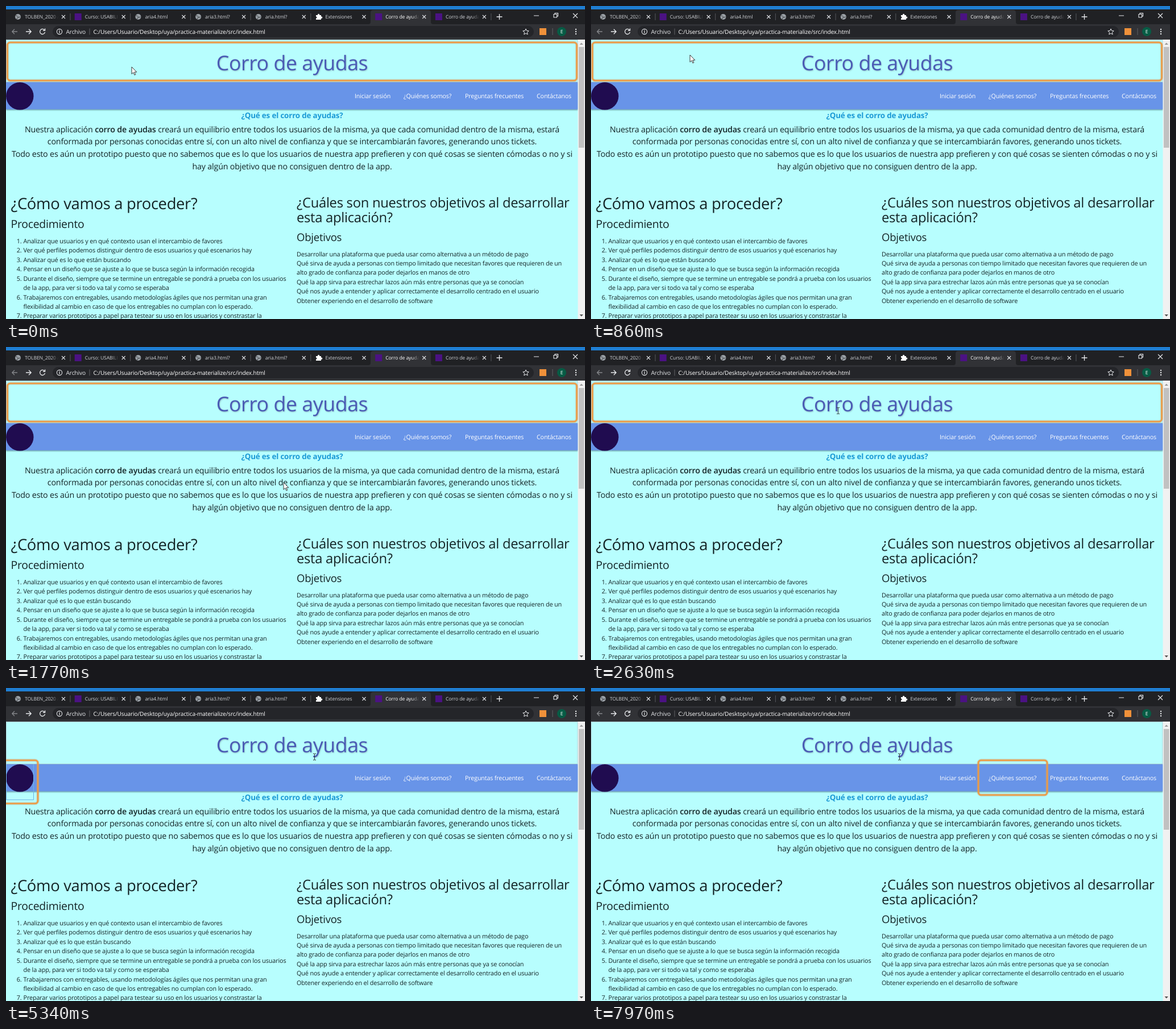
These frames come from a looping animation (1018x550 px, 8 s). An HTML page:

```html
<!DOCTYPE html>
<html lang="es">
<head>
<meta charset="utf-8">
<title>Corro de ayudas</title>
<style>
html, body { margin: 0; width: 100%; height: 100%; overflow: hidden; background: #b7fefe; }
svg { display: block; width: 1018px; height: 550px; }
text { font-family: "Open Sans", "Noto Sans", sans-serif; letter-spacing: -.0124em; text-rendering: geometricPrecision; white-space: pre; }
#intro { font-size: 14.27px; text-anchor: middle; }
#intro tspan { font-weight: 600; }
#lists { font-size: 10.83px; }
#nav { font-size: 10.7px; font-weight: 500; fill: #fff; }
#tabs text { font-size: 8.6px; }
.icon { fill: none; stroke: #e8eaed; stroke-width: 1.3; }
</style>
</head>
<body>
<svg viewBox="0 0 1018 550" fill="#142426">
  <defs>
    <filter id="soft" x="-10%" y="-30%" width="120%" height="170%"><feGaussianBlur stdDeviation="1"/></filter>
  </defs>
  <rect width="1018" height="550" fill="#b7fefe"/>

  <!-- page header -->
  <rect x=".5" y="59.5" width="1004.5" height="74" fill="none" stroke="#a0aeb6" opacity=".6"/>
  <g font-size="35.7" text-anchor="middle">
    <text x="503.7" y="114" fill="#334" opacity=".3" filter="url(#soft)">Corro de ayudas</text>
    <text x="503" y="112.5" fill="#4a5bb5">Corro de ayudas</text>
  </g>
  <rect y="135" width="1005.5" height="48" fill="#245" opacity=".5" filter="url(#soft)"/>
  <rect y="134" width="1005.5" height="47.5" fill="#6894e8"/>
  <circle cx="24.3" cy="158.3" r="24.2" fill="#200c50"/>
  <g id="nav"></g>

  <!-- page body -->
  <text x="503" y="196.5" font-size="13.4" font-weight="700" fill="#1c9ad6" text-anchor="middle">¿Qué es el corro de ayudas?</text>
  <g id="intro"></g>
  <text x="8.5" y="356.5" font-size="27.4">¿Cómo vamos a proceder?</text>
  <text x="8.5" y="390" font-size="19.4">Procedimiento</text>
  <g font-size="23.8">
    <text x="511" y="353.5">¿Cuáles son nuestros objetivos al desarrollar</text>
    <text x="511" y="380">esta aplicación?</text>
  </g>
  <text x="511" y="413" font-size="18.5">Objetivos</text>
  <g id="lists"></g>

  <!-- scroll bar -->
  <rect x="1005.5" y="59" width="12.5" height="491" fill="#f1f1f1"/>
  <rect x="1007" y="72" width="9.5" height="177" fill="#c1c1c1"/>
  <path d="M1008.5 68l3.2-3.5 3.2 3.5z" fill="#9a9a9a"/>
  <path d="M1008.5 542l3.2 3.5 3.2-3.5z" fill="#505050"/>

  <g id="rings" fill="none">
    <path id="outline" d="M.5 134V196.5H48.5V134" stroke="#6fb4e6"/>
    <rect class="ring" rx="5" stroke="#c9a27a" stroke-width="5" opacity=".45"/>
    <rect class="ring" rx="5" stroke="#ee9a42" stroke-width="2.6"/>
  </g>

  <!-- browser window -->
  <rect width="1018" height="7" fill="#1f7ed2"/>
  <rect y="6" width="1018" height="27" fill="#202124"/>
  <rect y="32" width="1018" height="27" fill="#313236"/>
  <rect x="82" y="35" width="846" height="20" rx="10" fill="#242529"/>
  <path d="M637 32q4 0 4-4V12q0-5 5-5h96q5 0 5 5v16q0 4 4 4z" fill="#313236"/>
  <g id="tabs"></g>
  <g class="icon">
    <path d="M867.5 14v10M862.5 19h10"/>
    <path d="M928 17h9M963 14.5h5.5V20H963zM965 14.5v-2h5.5V18h-2M997 13l8 8m0-8l-8 8" stroke-width="1.1"/>
    <path d="M20 45h-9m4-4.2L10.8 45 15 49.2" stroke="#85878b"/>
    <path d="M35 45h9m-4-4.2L44.2 45 40 49.2"/>
    <path d="M67.5 42A4.5 4.5 0 1 0 68.5 46M68.6 39.5V43H65"/>
    <circle cx="94" cy="45" r="4.6" stroke-width="1.1"/>
    <path d="M94 44v3.5M94 42v1.2"/>
    <path d="M147 39.5v11M961 39v12" stroke="#606267" stroke-width="1"/>
    <path d="M914 40l1.5 3.4 3.7.4-2.8 2.5.8 3.7-3.2-1.9-3.2 1.9.8-3.7-2.8-2.5 3.7-.4z" stroke-width="1"/>
  </g>
  <g fill="#e8eaed" font-size="10.2">
    <text x="105.5" y="48.5">Archivo</text>
    <text x="153.5" y="48.5" fill="#fff" font-size="10.1">C:/Users/Usuario/Desktop/uya/practica-materialize/src/index.html</text>
    <circle cx="1002" cy="41" r="1.2"/><circle cx="1002" cy="45" r="1.2"/><circle cx="1002" cy="49" r="1.2"/>
  </g>
  <rect x="938" y="39" width="12" height="12" fill="#f0913a"/>
  <circle cx="977" cy="45" r="8" fill="#075c45"/>
  <text x="977" y="48" font-size="8.5" fill="#fff" text-anchor="middle">E</text>

  <g id="pointer" stroke="#222">
    <path id="arrow" d="M0 0v12.5l2.9-2.7 2 4.5 1.9-.8-2-4.4h4z" fill="#fff" stroke-width=".9"/>
    <path id="beam" d="M-2-5.5h2l.5.5.5-.5h2M.5-5V5M-2 5.5h2l.5-.5.5.5h2" fill="none" stroke-width=".9"/>
  </g>
</svg>
<script>
const LOOP = 8000;
const $ = id => document.getElementById(id);
const label = (x, y, s, extra = '') => `<text x="${x}" y="${y}" ${extra}>${s}</text>`;

$('nav').innerHTML = [[613, 'Iniciar sesión'], [699, '¿Quiénes somos?'], [807, 'Preguntas frecuentes'], [933, 'Contáctanos']]
  .map(([x, s]) => label(x, 162, s)).join('');

$('intro').innerHTML = [
  'Nuestra aplicación <tspan>corro de ayudas</tspan> creará un equilibrio entre todos los usuarios de la misma, ya que cada comunidad dentro de la misma, estará',
  'conformada por personas conocidas entre sí, con un alto nivel de confianza y que se intercambiarán favores, generando unos tickets.',
  'Todo esto es aún un prototipo puesto que no sabemos que es lo que los usuarios de nuestra app prefieren y con qué cosas se sienten cómodas o no y si',
  'hay algún objetivo que no consiguen dentro de la app.'
].map((s, i) => label(503, 221.5 + 21.8 * i, s)).join('');

// A leading "+" marks a wrapped line that carries no number.
const steps = [
  'Analizar que usuarios y en qué contexto usan el intercambio de favores',
  'Ver qué perfiles podemos distinguir dentro de esos usuarios y qué escenarios hay',
  'Analizar qué es lo que están buscando',
  'Pensar en un diseño que se ajuste a lo que se busca según la información recogida',
  'Durante el diseño, siempre que se termine un entregable se pondrá a prueba con los usuarios',
  '+de la app, para ver si todo va tal y como se esperaba',
  'Trabajaremos con entregables, usando metodologías ágiles que nos permitan una gran',
  '+flexibilidad al cambio en caso de que los entregables no cumplan con lo esperado.',
  'Preparar varios prototipos a papel para testear su uso en los usuarios y constrastar la'
];
const goals = [
  'Desarrollar una plataforma que pueda usar como alternativa a un método de pago',
  'Qué sirva de ayuda a personas con tiempo limitado que necesitan favores que requieren de un',
  'alto grado de confianza para poder dejarlos en manos de otro',
  'Qué la app sirva para estrechar lazos aún más entre personas que ya se conocían',
  'Qué nos ayude a entender y aplicar correctamente el desarrollo centrado en el usuario',
  'Obtener experiendo en el desarrollo de software'
];
let count = 0;
$('lists').innerHTML = steps.map((s, i) => {
  const y = 416.8 + 16.45 * i;
  const number = s[0] === '+' ? '' : label(27.5, y, ++count + '.', 'text-anchor="end"');
  return number + label(30.5, y, s.replace('+', ''));
}).join('') + goals.map((s, i) => label(511, 439.5 + 16.45 * i, s)).join('');

const globe = x => `<circle cx="${x}" cy="19" r="5" fill="#9aa0a6"/><path d="M${x - 4} 17q3 0 4 2t4 0M${x - 2} 23q0-3 3-3" fill="none" stroke="#3c4043"/>`;
const square = x => `<rect x="${x - 6}" y="13" width="12" height="12" fill="#4b1283"/>`;
const puzzle = x => `<path d="M${x - 4.5} 16h3a1.7 1.7 0 1 1 3.2 0h2.8v2.6a1.7 1.7 0 1 1 0 3.2V24h-9v-2.4a1.6 1.6 0 1 0 0-3.2z" fill="#fff"/>`;
const tabs = [
  [globe, 'TOLBEN_2020 /'], [square, 'Curso: USABILI'], [globe, 'aria4.html'], [globe, 'aria3.html?'],
  [globe, 'aria.html?'], [puzzle, 'Extensiones'], [square, 'Corro de ayuda'], [square, 'Corro de ayuda']
];
$('tabs').innerHTML = tabs.map(([icon, s], i) => {
  const x = 21 + 105.7 * i, active = i === 6, back = active ? '#313236' : '#202124';
  const edge = i < 5 || i === 7 ? `<path d="M${x + 92} 13v12" stroke="#55575c"/>` : '';
  return `<linearGradient id="fade${i}"><stop stop-color="${back}" stop-opacity="0"/><stop offset=".7" stop-color="${back}"/></linearGradient>`
    + icon(x) + label(x + 12, 22, s, `fill="${active ? '#fff' : '#d0d3d7'}"`)
    + `<rect x="${x + 58}" y="12" width="19" height="14" fill="url(#fade${i})"/>`
    + `<path d="M${x + 77} 16l6 6m0-6l-6 6" stroke="#dfe1e5" stroke-width="1.1"/>` + edge;
}).join('');

// Highlight: start time, x, y, width, height
const stops = [
  [0, 2.5, 64, 1001, 67],
  [4600, -8, 127, 64, 76],
  [6100, 594.5, 127, 100, 61],
  [7600, 681, 127, 121, 61]
];
// Pointer: time, x, y
const path = [[0, 221, 107], [860, 174, 86], [1770, 488, 238], [2630, 434, 112], [3250, 542, 121], [LOOP, 542, 121]];
const rings = document.querySelectorAll('.ring');

function draw(t) {
  const stop = stops.findLast(s => s[0] <= t);
  for (const ring of rings)
    ['x', 'y', 'width', 'height'].forEach((name, i) => ring.setAttribute(name, stop[i + 1]));
  $('outline').style.display = stop === stops[1] ? '' : 'none';

  const k = path.findIndex(p => p[0] > t);
  const [t0, x0, y0] = path[k - 1], [t1, x1, y1] = path[k];
  const e = (1 - Math.cos(Math.PI * (t - t0) / (t1 - t0))) / 2;
  $('pointer').setAttribute('transform', `translate(${x0 + (x1 - x0) * e} ${y0 + (y1 - y0) * e})`);
  const overText = t > 2450;
  $('arrow').style.display = overText ? 'none' : '';
  $('beam').style.display = overText ? '' : 'none';
}

const start = performance.now();
function tick() {
  draw((performance.now() - start) % LOOP);
  requestAnimationFrame(tick);
}
tick();
</script>
</body>
</html>
```
